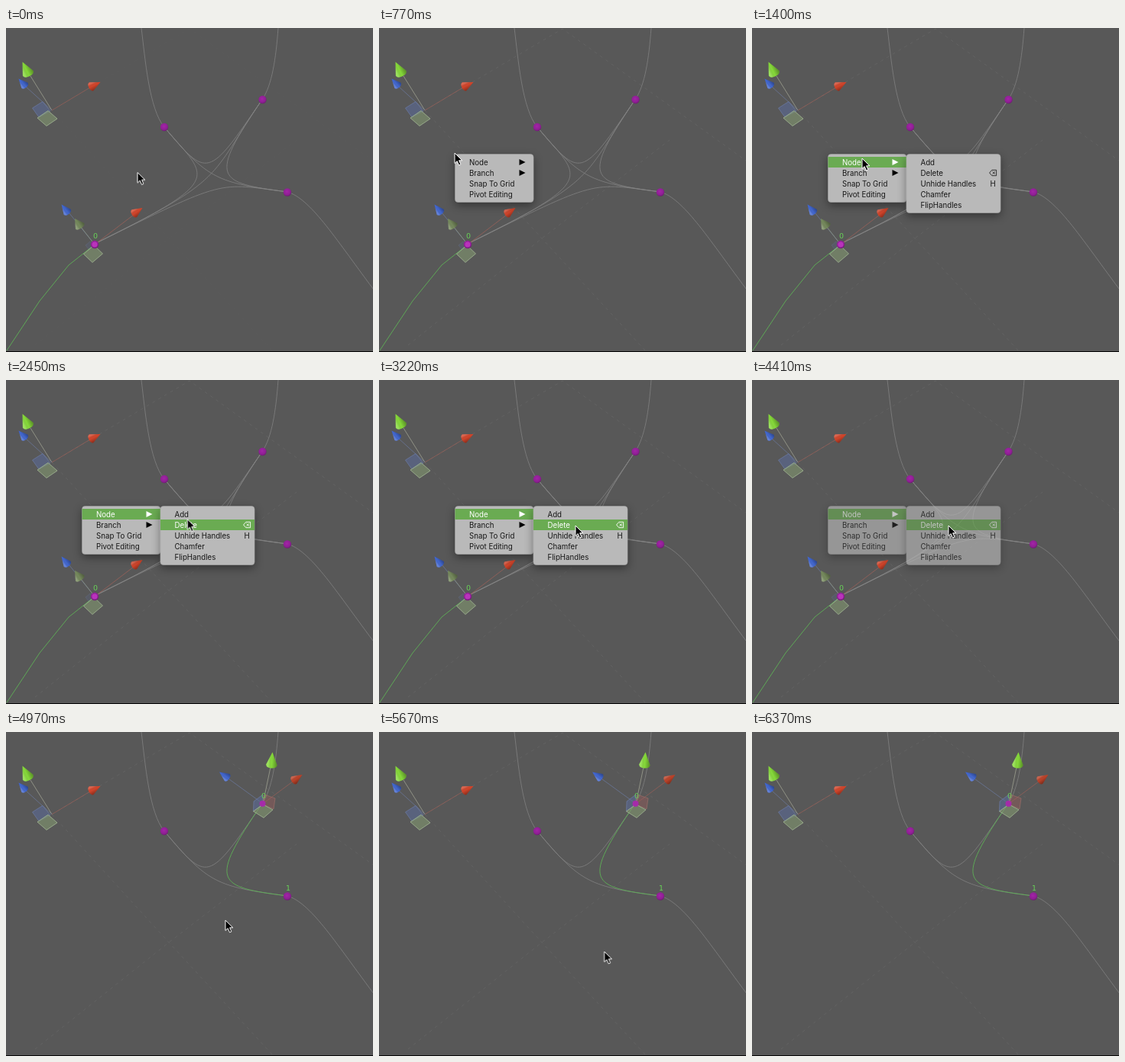
These frames come from a looping animation (480 px wide and 425 px high, 6440 ms). An HTML page:

```html
<!DOCTYPE html>
<html lang="en">
<head>
<meta charset="utf-8">
<title>Node context menu</title>
<style>
html, body { margin: 0; width: 100%; height: 100%; overflow: hidden; background: #585858; }
svg { display: block; width: 100%; height: 100%; }
.wire { fill: none; stroke: #848484; stroke-width: .75; }
.green { fill: none; stroke: #5fb257; stroke-width: .9; }
.grid { fill: none; stroke: #676767; stroke-width: .7; stroke-dasharray: 4 5; }
.axis { fill: none; stroke-width: .75; }
.quad { stroke-width: .8; }
.olive { fill: #7f936e; fill-opacity: .65; stroke: #a3b795; }
.blue { fill: #5b6b9c; fill-opacity: .55; stroke: #7283b3; stroke-opacity: .7; }
.red { fill: #a05c5c; fill-opacity: .4; stroke: #a5736c; stroke-opacity: .7; }
.label { font: 9.5px "DejaVu Sans", sans-serif; fill: #68d358; text-anchor: middle; }
.menu text { font: 9.7px Inter, "Liberation Sans", sans-serif; fill: #161616; }
.menu .on text { fill: #fff; }
.panel { fill: #b9b9b9; stroke: #a4a4a4; stroke-width: .5; }
.on rect { fill: #6aab52; }

/* One loop drives every part */
.grid, .before, .after, .menu, .sub, .node, .add, .del, .cursor { animation: 6.44s linear infinite; }
.grid { animation-name: grid; }
.before { animation-name: before; animation-timing-function: step-end; }
.after { animation-name: after; animation-timing-function: step-end; }
.menu { animation-name: menu; }
.sub { animation-name: sub; animation-timing-function: step-end; }
.node { animation-name: node; animation-timing-function: step-end; }
.add { animation-name: add; animation-timing-function: step-end; }
.del { animation-name: del; animation-timing-function: step-end; }
.cursor { animation-name: cursor; }
@keyframes grid { 0% { opacity: .15 } 11%, 100% { opacity: 1 } }
@keyframes before { 0% { opacity: 1 } 72.7%, 100% { opacity: 0 } }
@keyframes after { 0% { opacity: 0 } 72.7%, 100% { opacity: 1 } }
@keyframes menu {
  0%, 11.9% { opacity: 0 }
  11.91%, 66.3% { opacity: 1 }
  68.48% { opacity: .65 }
  71.7%, 100% { opacity: 0 }
}
@keyframes sub { 0% { opacity: 0 } 20.6%, 100% { opacity: 1 } }
@keyframes node { 0% { opacity: 0 } 19.5%, 100% { opacity: 1 } }
@keyframes add { 0% { opacity: 0 } 34.7% { opacity: 1 } 37.9%, 100% { opacity: 0 } }
@keyframes del { 0% { opacity: 0 } 37.9%, 100% { opacity: 1 } }
@keyframes cursor {
  0%, 1% { transform: translate(172px, 189.5px); animation-timing-function: ease-in-out }
  8.7%, 17.4% { transform: translate(99px, 164px); animation-timing-function: ease-in-out }
  20.2%, 28.3% { transform: translate(144px, 171px) }
  34.8% { transform: translate(203px, 175px) }
  38% { transform: translate(237px, 182.5px); animation-timing-function: ease-out }
  48%, 72.8% { transform: translate(257px, 191px) }
  77.2% { transform: translate(287px, 247px); animation-timing-function: ease-out }
  83.7% { transform: translate(292px, 287px) }
  96.7% { transform: translate(300px, 290px) }
  97.8%, 98.7% { transform: translate(402px, 304px); opacity: 1 }
  98.71%, 100% { transform: translate(402px, 304px); opacity: 0 }
}
</style>
</head>
<body>
<svg viewBox="0 0 480 425" preserveAspectRatio="none">
  <defs>
    <radialGradient id="ball" cx=".45" cy=".4" r=".65">
      <stop offset="0" stop-color="#a324a8"/>
      <stop offset=".65" stop-color="#8f1f94"/>
      <stop offset="1" stop-color="#661a6a"/>
    </radialGradient>
    <linearGradient id="shade">
      <stop offset=".2" stop-color="#fff" stop-opacity=".18"/>
      <stop offset=".5" stop-color="#000" stop-opacity="0"/>
      <stop offset="1" stop-color="#000" stop-opacity=".35"/>
    </linearGradient>
    <filter id="shadow" x="-30%" y="-30%" width="160%" height="180%">
      <feDropShadow dx="0" dy="4" stdDeviation="6" flood-color="#000" flood-opacity=".4"/>
    </filter>
    <path id="body" d="M0 0L7.600 16.500Q7 21 0 21Q-7 21-7.600 16.500Z"/>
    <g id="cone">
      <use href="#body" fill="currentColor"/>
      <use href="#body" fill="url(#shade)"/>
    </g>
    <circle id="knot" r="5.200" fill="url(#ball)"/>
    <path id="arrow" d="M183.500 172L191.500 176L183.500 180Z"/>
    <g id="erase" fill="none" stroke="currentColor" stroke-width=".9">
      <path d="M313.800 186.300H319.600V193.700H313.800L310.600 190Z"/>
      <path d="M314.600 188.300L318 191.700M318 188.300L314.600 191.700"/>
    </g>
  </defs>

  <rect width="480" height="425" fill="#585858"/>
  <path class="grid" d="M60 108L240 1L480 174M60 108L213 276L350 425M38 416L213 276L380 147"/>

  <!-- Splines that stay -->
  <path class="wire" d="M177 0C182 40 187 106 207 130M356 0C353 40 348 75 335 94M368 215C398 224 428 272 480 342"/>
  <path class="wire" d="M207 130C264 198 264 198 335 94M207 130C264 198 275 203 368 215"/>

  <!-- World gizmo -->
  <path class="axis" stroke="#a3a694" d="M32 63L60 108"/>
  <path class="axis" stroke="#6b789c" d="M26 77L60 108"/>
  <path class="axis" stroke="#986058" d="M110 78L60 108"/>
  <path class="quad blue" d="M34.500 105L48 96.500L58 109L43 117Z"/>
  <path class="quad olive" d="M41 118L55 108.500L67 119L53 128.500Z"/>
  <use href="#cone" color="#86d93a" transform="translate(21.500 44.500) rotate(-26)"/>
  <use href="#cone" color="#4267cf" transform="translate(16.500 66.500) rotate(-42) scale(.72)"/>
  <use href="#cone" color="#d2452b" transform="translate(123.500 71) rotate(64) scale(.8)"/>

  <!-- Selected node that gets deleted -->
  <g class="before">
    <path class="wire" d="M116 283C290 197 264 198 207 130M116 283C290 197 264 198 335 94M116 283C290 197 275 203 368 215"/>
    <path class="wire" d="M335 94C264 198 275 203 368 215"/>
    <path class="green" d="M116 284L82 311L44 358L1 423"/>
    <path class="axis" stroke="#6b789c" d="M82 242L116 284"/>
    <path class="axis" stroke="#8c967e" d="M98 261L116 284"/>
    <path class="axis" stroke="#a0625a" d="M167 245L116 284"/>
    <path class="quad blue" d="M104 285L110 280L116 284L108 290Z" opacity=".4"/>
    <path class="quad olive" d="M101.500 296.500L115 285L126.500 296L113 307.500Z"/>
    <use href="#cone" color="#4267cf" transform="translate(72.500 231.500) rotate(-38) scale(.75)"/>
    <use href="#cone" color="#75895c" transform="translate(90 250) rotate(-34) scale(.9 .72)"/>
    <use href="#cone" color="#d2452b" transform="translate(178.500 236) rotate(56) scale(.78)"/>
    <use href="#knot" x="116" y="284"/>
    <circle cx="116" cy="284" r="3.500" fill="#b933bc"/>
    <text class="label" x="117" y="276">0</text>
    <use href="#knot" x="335.500" y="94"/>
  </g>

  <!-- Selection after the delete -->
  <g class="after">
    <path class="green" d="M335 94C264 198 275 203 368 215"/>
    <path class="axis" stroke="#a3a694" d="M346 46L336 94"/>
    <path class="axis" stroke="#6b789c" d="M292 62L336 94"/>
    <path class="axis" stroke="#986058" d="M375 65L336 94"/>
    <path class="quad blue" d="M324 91L336 82L336 95L323.500 104Z"/>
    <path class="quad red" d="M338 82L352 87L350 101L336 95Z"/>
    <path class="quad olive" d="M323.500 104L336 95L349 102L337 112.500Z"/>
    <use href="#cone" color="#86d93a" transform="translate(348.500 26.500) rotate(4) scale(.95 1)"/>
    <use href="#cone" color="#4267cf" transform="translate(279 52.500) rotate(-55) scale(.75)"/>
    <use href="#cone" color="#bb4229" transform="translate(387.500 56) rotate(56) scale(.78)"/>
    <circle cx="335.500" cy="94" r="4" fill="#a52ba9"/>
    <text class="label" x="337" y="87">0</text>
    <text class="label" x="369" y="208">1</text>
  </g>

  <use href="#knot" x="207" y="130"/>
  <use href="#knot" x="368" y="215.500"/>
  <rect y="424" width="480" height="1" fill="#050505"/>

  <!-- Context menu -->
  <g class="menu">
    <g filter="url(#shadow)"><rect class="panel" x="99.500" y="165.500" width="102.500" height="63" rx="4"/></g>
    <text x="118" y="179.500">Node</text>
    <text x="118" y="193.500">Branch</text>
    <text x="118" y="207.500">Snap To Grid</text>
    <text x="118" y="221.500">Pivot Editing</text>
    <use href="#arrow"/>
    <use href="#arrow" y="14"/>
    <g class="on node">
      <rect x="99.500" y="169" width="102.500" height="14"/>
      <text x="118" y="179.500">Node</text>
      <use href="#arrow" fill="#fff"/>
    </g>
    <g class="sub">
      <g filter="url(#shadow)"><rect class="panel" x="202" y="165.500" width="123" height="77" rx="4"/></g>
      <text x="220.500" y="179.500">Add</text>
      <text x="220.500" y="193.500">Delete</text>
      <text x="220.500" y="207.500">Unhide Handles</text>
      <text x="220.500" y="221.500">Chamfer</text>
      <text x="220.500" y="235.500">FlipHandles</text>
      <text x="311.500" y="207.500">H</text>
      <use href="#erase" color="#222"/>
      <g class="on add">
        <rect x="202" y="169" width="123" height="14"/>
        <text x="220.500" y="179.500">Add</text>
      </g>
      <g class="on del">
        <rect x="202" y="183" width="123" height="14"/>
        <text x="220.500" y="193.500">Delete</text>
        <use href="#erase" color="#fff"/>
      </g>
    </g>
  </g>

  <g class="cursor">
    <path d="M0 0V13.500L3.200 10.600L5.500 15.900L7.900 14.900L5.600 9.800H9.900Z" fill="#000" stroke="#fff" stroke-width="1"/>
  </g>
</svg>
</body>
</html>
```
